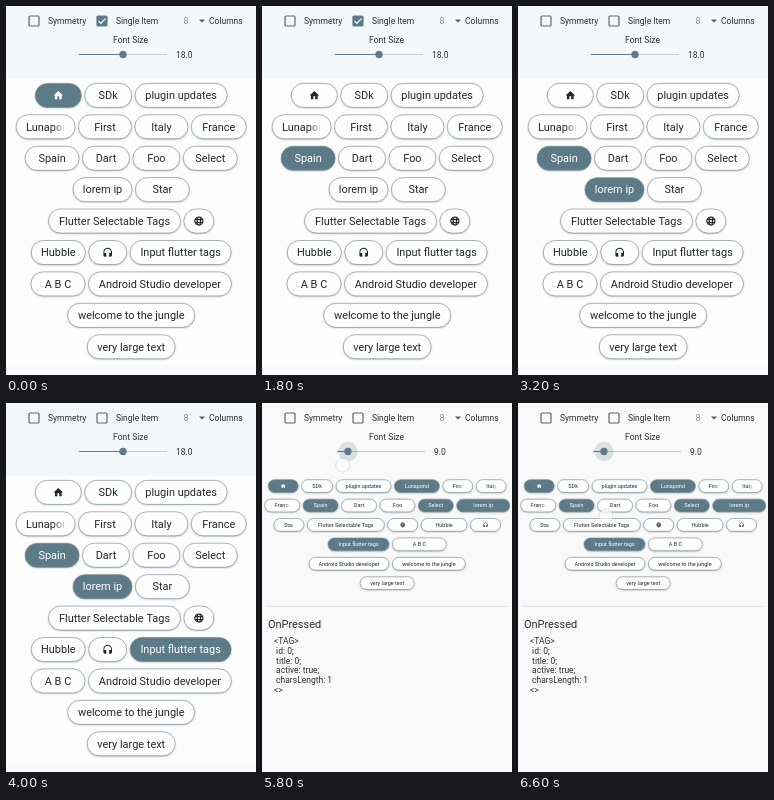
An HTML page with a canvas that plays this animation: 250 by 369 pixels, repeating every 6.8 s.

```html
<!DOCTYPE html>
<html lang="en">
<head>
<meta charset="utf-8">
<title>Selectable tags</title>
<style>
html, body { margin: 0; width: 100%; height: 100%; overflow: hidden; background: #f9f9f9; }
canvas { display: block; width: 250px; height: 369px; }
</style>
</head>
<body>
<canvas id="stage"></canvas>
<script>
const W = 250, H = 369, LOOP = 6800, STEP = 200;
const FACE = 'Roboto, "Open Sans", sans-serif';
const INK = '#2b2d2e', GREY = '#606769', MAIN = '#5c7b87';
const UNIT = 0.608; // logical pixel to stage pixel

const canvas = document.getElementById('stage');
const ctx = canvas.getContext('2d');
const dpr = window.devicePixelRatio || 1;
canvas.width = W * dpr;
canvas.height = H * dpr;

const TAGS = ['@home', 'SDk', 'plugin updates', 'Lunapond', 'First', 'Italy', 'France',
  'Spain', 'Dart', 'Foo', 'Select', 'lorem ip', 'Star', 'Flutter Selectable Tags',
  '@globe', 'Hubble', '@headset', 'Input flutter tags', 'A B C',
  'Android Studio developer', 'welcome to the jungle', 'very large text'];

// Row widths for the large, medium and small font
const LARGE = {
  rows: [[46, 47, 92], [59, 53, 53, 55], [54, 47, 47, 54], [59, 54], [132, 30],
    [54, 38, 101], [54, 143], [127], [88]],
  cut: ['Lunapond']
};
const MEDIUM = {
  rows: [[30, 31, 55, 45, 30, 30], [35, 35, 35, 35, 35, 53], [30, 77, 30, 46, 30],
    [61, 54], [80, 73], [54]],
  cut: ['First', 'Italy', 'France', 'Star']
};
const SMALL = {
  rows: [[30, 30, 54, 45, 30, 31], [35, 35, 35, 35, 35, 53], [30, 57, 30, 47, 31],
    [54, 54], [61, 57], [54]],
  cut: []
};

// Single choice first, then tags that stay on from a given time
const SINGLE = [[0, '@home'], [800, 'Dart'], [1800, 'Spain']];
const MULTI = { 'lorem ip': 3200, 'Input flutter tags': 3800, 'Select': 4400,
  'Lunapond': 4800, '@home': 5400 };
const FONT = [[5400, 18], [5600, 15], [5800, 9], [6000, 6], [6200, 6], [6400, 8], [6600, 9]];
const DOT_X = [[5400, 116], [6000, 63], [6600, 88]];
const DOT_Y = [[5400, 52], [6000, 67], [6600, 113]];

const ICONS = {
  '@home': new Path2D('M10 20v-6h4v6h5v-8h3L12 3 2 12h3v8z'),
  '@headset': new Path2D('M12 2c-5 0-9 4-9 9v7c0 1.7 1.3 3 3 3h3v-8H5v-2c0-3.9 3.1-7 7-7s7 3.1 7 7v2h-4v8h3c1.7 0 3-1.3 3-3v-7c0-5-4-9-9-9z'),
  '@globe': new Path2D('M3.5 12a8.5 8.5 0 1 0 17 0a8.5 8.5 0 1 0-17 0M8.5 12a3.5 8.5 0 1 0 7 0a3.5 8.5 0 1 0-7 0M4 9h16M4 15h16')
};

function track(keys, t) {
  if (t <= keys[0][0]) return keys[0][1];
  for (let i = 1; i < keys.length; i++) {
    const [a, v] = keys[i - 1], [b, w] = keys[i];
    if (t <= b) return v + (w - v) * (t - a) / (b - a);
  }
  return keys[keys.length - 1][1];
}

function selected(tag, t) {
  const choice = SINGLE.filter(([at]) => t >= at).pop()[1];
  return tag === choice || t >= MULTI[tag];
}

function text(str, x, y, size, color = INK, align = 'left') {
  ctx.font = `${size}px ${FACE}`;
  ctx.textAlign = align;
  ctx.textBaseline = 'alphabetic';
  ctx.fillStyle = color;
  ctx.fillText(str, x, y + size * 0.35);
}

function disc(x, y, r, color) {
  ctx.beginPath();
  ctx.arc(x, y, r, 0, Math.PI * 2);
  ctx.fillStyle = color;
  ctx.fill();
}

function line(x1, x2, y, color, width) {
  ctx.beginPath();
  ctx.moveTo(x1, y);
  ctx.lineTo(x2, y);
  ctx.strokeStyle = color;
  ctx.lineWidth = width;
  ctx.stroke();
}

function icon(name, x, y, size, color) {
  ctx.save();
  ctx.translate(x - size / 2, y - size / 2);
  ctx.scale(size / 24, size / 24);
  if (name === '@globe') {
    ctx.strokeStyle = color;
    ctx.lineWidth = 2.4;
    ctx.stroke(ICONS[name]);
  } else {
    ctx.fillStyle = color;
    ctx.fill(ICONS[name]);
  }
  ctx.restore();
}

function checkbox(x, y, on) {
  ctx.beginPath();
  ctx.roundRect(x - 5, y - 5, 10, 10, 1);
  ctx.lineWidth = 1.2;
  ctx.strokeStyle = on ? MAIN : GREY;
  ctx.globalAlpha = on || 1;
  ctx.stroke();
  if (on) {
    ctx.fillStyle = MAIN;
    ctx.fill();
    ctx.beginPath();
    ctx.moveTo(x - 3.4, y + 0.2);
    ctx.lineTo(x - 1.2, y + 2.5);
    ctx.lineTo(x + 3.6, y - 2.6);
    ctx.strokeStyle = '#fff';
    ctx.stroke();
  }
  ctx.globalAlpha = 1;
}

function touch(x, y) {
  disc(x, y, 7, 'rgba(255,255,255,.65)');
  ctx.lineWidth = 0.8;
  ctx.strokeStyle = 'rgba(130,140,145,.3)';
  ctx.stroke();
}

function pill(tag, x, y, w, h, size, cut, on) {
  ctx.beginPath();
  ctx.roundRect(x, y - h / 2, w, h, h / 2);
  ctx.save();
  ctx.shadowColor = 'rgba(70,80,85,.45)';
  ctx.shadowBlur = 1.8 * dpr;
  ctx.shadowOffsetY = 0.7 * dpr;
  ctx.fillStyle = on ? MAIN : '#fefefe';
  ctx.fill();
  ctx.restore();
  ctx.lineWidth = 0.65;
  ctx.strokeStyle = '#7b9099';
  ctx.stroke();

  const rgb = on ? '255,255,255' : '36,38,40';
  const color = `rgb(${rgb})`;
  const mid = x + w / 2;
  if (tag[0] === '@') return icon(tag, mid, y, size * 1.05, color);
  if (!cut) return text(tag, mid, y, size, color, 'center');

  const left = x + 10, right = x + w - 10;
  const fade = ctx.createLinearGradient(left, 0, right, 0);
  fade.addColorStop(0.7, color);
  fade.addColorStop(1, `rgba(${rgb},.1)`);
  ctx.save();
  ctx.beginPath();
  ctx.rect(left, y - h / 2, w - 20, h);
  ctx.clip();
  text(tag, left, y, size, fade);
  ctx.restore();
}

function header(t, font) {
  const label = 14 * UNIT;
  checkbox(28, 15, 0);
  text('Symmetry', 42, 15, label);
  if (t === 2400) touch(95, 15);
  checkbox(96, 15, t < 2400 ? 1 : t < 2600 ? 0.65 : 0);
  text('Single Item', 110, 15, label);
  text('8', 177.5, 15, label + 0.3, '#858b8e');
  ctx.beginPath();
  ctx.moveTo(193, 13.5);
  ctx.lineTo(199, 13.5);
  ctx.lineTo(196, 16.7);
  ctx.fillStyle = '#5b6265';
  ctx.fill();
  text('Columns', 203, 15, label);
  text('Font Size', 124.5, 34, label, INK, 'center');

  const shift = font < 10 ? 2 : 0;
  const left = 73 + shift, right = 161 + shift;
  const knob = left + (right - left) * (font - 6) / 24;
  line(left, right, 48.5, '#c0ced3', 1.1);
  line(left, knob, 48.5, MAIN, 1.1);
  if (t >= 5400) disc(knob, 48.5, 9.7, 'rgba(92,123,135,.2)');
  disc(knob, 48.5, 3.7, MAIN);
  text(font.toFixed(1), 170 + shift, 49, label);
}

function details(y) {
  line(4, W - 4, y, '#d9dbdb', 0.8);
  text('OnPressed', 6, y + 17.5, 18 * UNIT);
  const rows = ['<TAG>', ' id: 0;', ' title: 0;', ' active: true;', ' charsLength: 1', '<>'];
  rows.forEach((row, i) => text(row, 12, y + 35 + i * 9.7, 14 * UNIT));
}

function draw(t) {
  const font = Math.round(track(FONT, t));
  const big = font >= 12;
  const plan = big ? LARGE : font > 7 ? MEDIUM : SMALL;
  const grow = font - 6;
  const top = 81 + grow * 0.7, pitch = 15.4 + grow * 1.335;
  const h = 9 + grow * 1.25, gap = 3.4;
  const last = top + (plan.rows.length - 1) * pitch;

  ctx.setTransform(dpr, 0, 0, dpr, 0, 0);
  ctx.fillStyle = '#f9f9f9';
  ctx.fillRect(0, 0, W, H);
  if (big) {
    ctx.fillStyle = '#f5f8f9';
    ctx.fillRect(0, 0, W, 73);
    ctx.fillStyle = '#fdfdfd';
    ctx.fillRect(0, 73, W, last + 18 - 73);
  }
  header(t, font);

  let n = 0;
  plan.rows.forEach((row, r) => {
    const widths = row.map(w => big ? 20 + (w - 20) * font / 18 : w);
    const total = widths.reduce((a, b) => a + b) + gap * (row.length - 1);
    let x = 125.2 - total / 2;
    for (const w of widths) {
      const tag = TAGS[n++];
      pill(tag, x, top + r * pitch, w, h, font * UNIT, plan.cut.includes(tag), selected(tag, t));
      x += w + gap;
    }
  });
  if (font < 18) details(last + 22 + grow * 0.4);
  if (t >= 5400) touch(track(DOT_X, t), track(DOT_Y, t));
}

function tick(now) {
  draw(Math.floor(now % LOOP / STEP) * STEP);
  requestAnimationFrame(tick);
}
draw(0);
requestAnimationFrame(tick);
</script>
</body>
</html>
```
